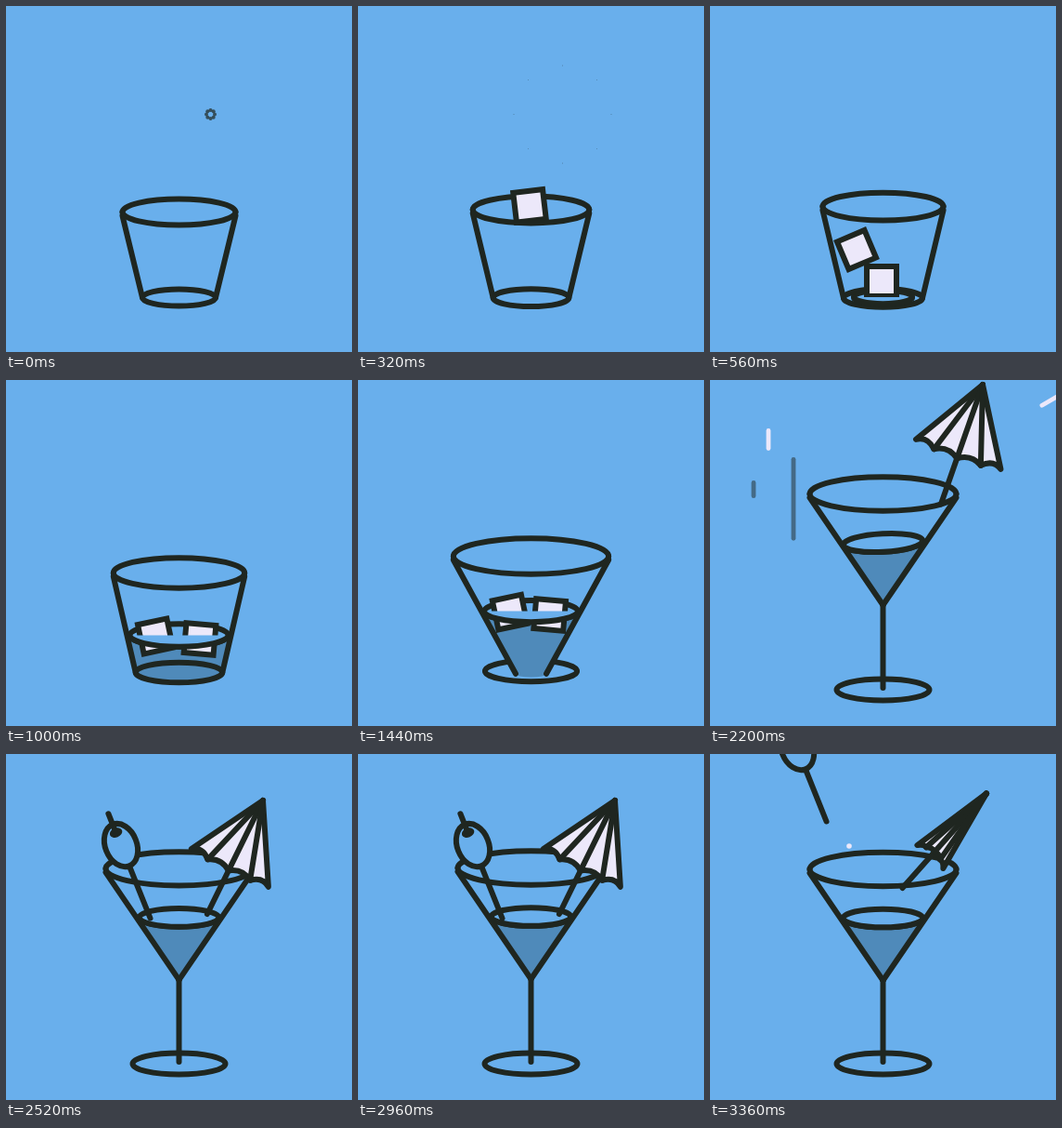
Write an HTML page with a canvas that moves like this. It is 373 px wide and 372 px high and loops after 3400 ms.

```html
<!DOCTYPE html>
<html lang="en">
<head>
<meta charset="utf-8">
<title>Cocktail</title>
<style>
html, body { margin: 0; width: 100%; height: 100%; overflow: hidden; background: #69afec; }
canvas { display: block; }
</style>
</head>
<body>
<canvas id="stage" width="373" height="372"></canvas>
<script>
const ctx = document.getElementById('stage').getContext('2d');
const SKY = '#69afec', INK = '#1f2620', LIQUID = '#4f8aba', ICE = '#ece8fa';
const LOOP = 3400, STEP = 40, CX = 186.5, FLATNESS = 0.23;
const RAD = Math.PI / 180;

const TUMBLER = { rimY: 221.5, rim: 61, botY: 313.5, bot: 39.5, baseY: 313.5, base: 39.5, depth: 39 };
const WIDE = { rimY: 207, rim: 71, botY: 314.5, bot: 47, baseY: 314.5, base: 47, depth: 39 };
const CONE = { rimY: 180, rim: 90.5, botY: 316.5, bot: 0, baseY: 312, base: 51, depth: 81 };
const MARTINI = { rimY: 122.5, rim: 79, botY: 242, bot: 0, baseY: 333, base: 50, depth: 66 };

const lerp = (a, b, p) => a + (b - a) * p;
const prog = (t, from, to) => Math.max(0, Math.min(1, (t - from) / (to - from)));
const smooth = p => p * p * (3 - 2 * p);
const easeIn = p => p * p;
const easeOut = p => 1 - (1 - p) * (1 - p);
const backOut = p => 1 + 2 * (p - 1) ** 3 + (p - 1) ** 2;
const hump = p => Math.sin(Math.PI * p);

function blend(a, b, p) {
  const mix = {};
  for (const k in a) mix[k] = lerp(a[k], b[k], p);
  return mix;
}

function paint(fill, stroke) {
  if (fill) { ctx.fillStyle = fill; ctx.fill(); }
  if (stroke) { ctx.strokeStyle = stroke; ctx.stroke(); }
}

function line(x1, y1, x2, y2, color = INK) {
  ctx.beginPath();
  ctx.moveTo(x1, y1);
  ctx.lineTo(x2, y2);
  paint(null, color);
}

function oval(x, y, rx, ry, fill, stroke, tilt = 0, from = 0, to = 2) {
  ctx.beginPath();
  ctx.ellipse(x, y, rx, ry, tilt * RAD, from * Math.PI, to * Math.PI);
  paint(fill, stroke);
}

const ring = (y, rx, fill, ...arc) => oval(CX, y, rx, rx * FLATNESS, fill, INK, ...arc);

function place(x, y, angle, draw) {
  ctx.save();
  ctx.translate(x, y);
  ctx.rotate(angle * RAD);
  draw();
  ctx.restore();
}

// The cube falls, then drifts to its floating place while melting.
function drawCube(t, cube, surfaceY) {
  const { start, land, landX, landY, spin, landAngle, side, sink, angle, melted } = cube;
  const size = 32 * (1 - prog(t, 1140, melted) ** 6);
  if (t < start || size < 1) return;
  const fall = prog(t, start, land);
  const drift = smooth(prog(t, 560, 1000));
  const floatX = CX + side * lerp(1, 0.84, smooth(prog(t, 1140, 1640)));
  const x = lerp(landX, floatX, drift);
  const y = lerp(lerp(-30, landY, easeIn(fall)), surfaceY + sink, drift);
  const turn = lerp(lerp(spin, landAngle, fall), angle * size / 32, drift);
  place(x, y, turn, () => {
    ctx.lineJoin = 'miter';
    ctx.beginPath();
    ctx.rect(-size / 2, -size / 2, size, size);
    paint(ICE, INK);
  });
}

const CUBES = [
  { start: 300, land: 560, landX: 158, landY: 262, spin: -60, landAngle: -23,
    side: -25.5, sink: 1, angle: -12, melted: 1808 },
  { start: 60, land: 360, landX: 185, landY: 296, spin: -50, landAngle: 0,
    side: 22.5, sink: 4, angle: 5, melted: 1980 }
];

function drawGlass(t) {
  const grow = prog(t, 0, 1020) ** 1.5;
  const morph = smooth(prog(t, 1140, 1640));
  const lift = backOut(prog(t, 1760, 2200));
  const g = blend(blend(blend(TUMBLER, WIDE, grow), CONE, morph), MARTINI, lift);
  const dip = 3 * hump(prog(t, 2500, 2720)) + 1.5 * smooth(prog(t, 3000, 3360));
  g.rimY += dip;
  g.botY += dip;

  const top = g.rimY + 4;
  const spread = easeOut(prog(t, 440, 660));
  const surfaceY = g.botY - 1 - g.depth * easeOut(prog(t, 560, 960));
  const wall = lerp(g.bot, g.rim, (g.botY - surfaceY) / (g.botY - top));
  const rx = (wall - 3) * spread;
  const tilt = -3 * hump(prog(t, 1960, 2440));

  if (morph) ring(g.baseY, g.base);
  if (spread) {
    const w = g.bot * spread;
    ctx.beginPath();
    ctx.moveTo(CX + rx, surfaceY);
    ctx.ellipse(CX, g.botY, w, w * FLATNESS, 0, 0, Math.PI);
    ctx.lineTo(CX - rx, surfaceY);
    paint(LIQUID);
  }
  if (!morph) ring(g.baseY, g.base);
  ring(g.rimY, g.rim, null, 0, 1, 2);
  if (spread) ring(surfaceY, rx, SKY, tilt);
  for (const cube of CUBES) drawCube(t, cube, surfaceY);
  if (spread) ring(surfaceY, rx, SKY, tilt, 0, 1);
  ring(g.rimY, g.rim, null, 0, 0, 1);
  for (const side of [-1, 1]) line(CX + side * g.rim, top, CX + side * g.bot, g.botY);
  if (g.botY < g.baseY - 2) line(CX, g.botY, CX, g.baseY - 2);
}

function drawUmbrella(t) {
  const away = 1 - easeOut(prog(t, 1960, 2440));
  const fold = smooth(prog(t, 3000, 3360));
  if (away === 1) return;
  const open = lerp(0.95 + 0.2 * away, 0.37, fold);
  const ribs = [-1, -0.57, 0, 0.57, 1].map(k => {
    const a = k * open * 31.4 * RAD, len = 84 + 9 * k * k;
    return [len * Math.sin(a), len * Math.cos(a)];
  });
  const x = 277 + 68 * away + 21 * fold, y = 50 - 180 * away - 7.5 * fold;
  place(x, y, 26.2 - 27.6 * away + 15.5 * fold, () => {
    line(0, 0, 0, 136);
    ctx.beginPath();
    ctx.moveTo(0, 0);
    ribs.forEach(([bx, by], i) => {
      if (!i) return ctx.lineTo(bx, by);
      const [ax, ay] = ribs[i - 1];
      ctx.quadraticCurveTo((ax + bx) / 2, (ay + by) / 2 - 9 * open, bx, by);
    });
    ctx.closePath();
    paint(ICE, INK);
    for (const r of ribs.slice(1, 4)) line(0, 0, ...r);
  });
}

function drawOlive(t) {
  if (t < 2320) return;
  const away = 1.8 * (1 - easeIn(prog(t, 2320, 2520))) + easeIn(Math.max(0, t - 3040) / 320);
  const bump = 4 * hump(prog(t, 2520, 2680));
  place(155.5 - 30 * away, 176.5 - 104 * away + bump, -21.9, () => {
    line(0, 0, 0, -61);
    oval(0, -84.5, 17, 24, SKY, INK);
    oval(0, -99, 7, 5, INK);
    line(0, -121, 0, -101);
  });
}

// A stroke whose head runs ahead of its tail.
function streak(t, start, x, y, angle, len, color) {
  const p = prog(t, start, start + 400);
  if (p === 0 || p === 1) return;
  place(x, y, angle, () => {
    ctx.lineWidth = 4.8;
    if (color === INK) ctx.globalAlpha = 0.5;
    line(len * easeIn(p), 0, len * easeOut(p), 0, color);
  });
}

function drawStreaks(t) {
  streak(t, 1820, 47, 260, -90, 150, INK);
  streak(t, 1960, 90, 234, -90, 177, INK);
  streak(t, 1960, 63, 88, -90, 40, ICE);
  streak(t, 1960, 344.5, 35, -30, 43, ICE);
}

function drawPops(t) {
  const p = prog(t, 0, 400);
  const r = 4.5 + 50 * easeOut(p);
  ctx.globalAlpha = 0.7;
  for (let a = 0; a < 360; a += 45) {
    const size = 2 * (1 - p);
    oval(220.5 + r * Math.cos(a * RAD), 116.5 + r * Math.sin(a * RAD), size, size, INK);
  }
  ctx.globalAlpha = 1;
  if (t > 3320) oval(150, 99, 2.8, 2.8, ICE);
}

function frame(now) {
  const t = Math.floor(now % LOOP / STEP) * STEP;
  ctx.fillStyle = SKY;
  ctx.fillRect(0, 0, 373, 372);
  ctx.lineWidth = 6;
  ctx.lineCap = ctx.lineJoin = 'round';
  drawStreaks(t);
  drawGlass(t);
  drawUmbrella(t);
  drawOlive(t);
  drawPops(t);
}

let begin;
function tick(now) {
  begin ??= now;
  frame(now - begin);
  requestAnimationFrame(tick);
}
frame(0);
requestAnimationFrame(tick);
</script>
</body>
</html>
```
